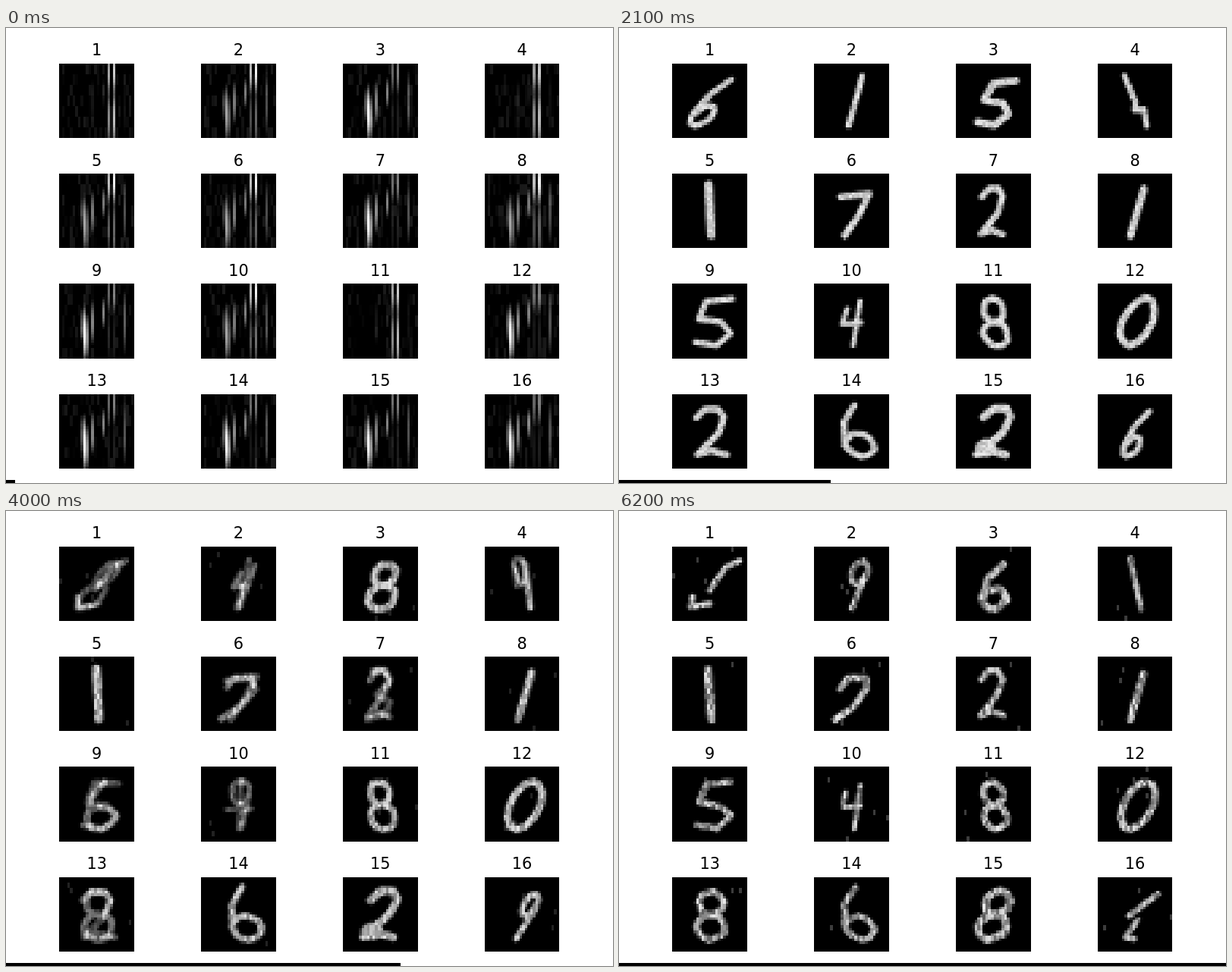
These frames come from a looping animation (800 by 600 pixels, 6300 ms). An HTML page with a canvas:

```html
<!DOCTYPE html>
<html lang="en">
<head>
<meta charset="utf-8">
<title>Digit samples</title>
<style>
html, body { margin: 0; width: 100%; height: 100%; overflow: hidden; background: #fff; }
canvas { display: block; }
</style>
</head>
<body>
<canvas id="stage" width="800" height="600"></canvas>
<script>
const STEP_MS = 100, STEPS = 63, GRID = 28, BOTTOM = 23.3;
const poseSteps = [13, 21, 34, 45, 56, 62];

// Handwriting shapes in a unit box.
const glyphs = {
  one: pen => pen.line(.5, 0, .5, 1),
  two: pen => pen.line(.05, .2, .3, .02, .7, .02, .9, .2, .75, .5, .1, .95, .5, .87, 1, .95),
  three: pen => pen.line(.2, .03, .7, .03, .9, .25, .45, .5, .95, .65, .8, .9, .1, 1),
  four: pen => { pen.line(.2, .25, .1, .55, .8, .5); pen.line(.75, .1, .6, 1); },
  five: pen => pen.line(1, .02, .3, .05, .1, .42, .7, .52, 1, .72, .6, 1, 0, .92),
  six: pen => { pen.line(.6, 0, .2, .35, .1, .75); pen.ring(.5, .78, .42, .22); },
  seven: pen => pen.line(0, .12, .95, .03, .75, .5, .4, 1),
  eight: pen => { pen.ring(.5, .25, .38, .24); pen.ring(.5, .74, .45, .26); },
  nine: pen => { pen.ring(.5, .25, .38, .24); pen.line(.85, .3, .6, 1); },
  zero: pen => pen.ring(.5, .5, .5, .5),
  hook: pen => { pen.line(.9, 0, .45, .1, .5, .6); pen.line(0, .75, .3, .97, 1, .9); },
  curl: pen => pen.line(.05, .3, .25, .05, .85, .05, 1, .3, .6, .75, .05, 1),
  bend: pen => pen.line(.1, 0, .4, .55, .3, .68, .85, .7, .85, 1),
  cross: pen => { pen.line(.5, 0, .5, 1); pen.line(0, .6, 1, .6); },
  blot: pen => { glyphs.two(pen); pen.ring(.3, .83, .22, .1); },
  elbow: pen => { pen.line(1, 0, 0, .5); pen.line(.6, .55, .4, .95, .9, 1); }
};

// Strengths of the opening stripes: left, middle, top, lower right.
const stripeKinds = {
  rail: [0, .1, .8, .9],
  left: [1, .65, .5, .15],
  mixed: [.65, .6, .95, .5]
};

// Opening stripes: column, first row, last row, group, gain.
const stripeBars = [
  [8, 9, 22, 0, .35], [9, 7, 30, 0, 1], [10, 11, 29, 0, .6],
  [12, 6, 23, 1, .8], [16, 5, 17, 1, .8], [24, 2, 27, 1, .5],
  [18, -6, 12, 2, .8], [20, -6, 12, 2, 1],
  [18, 9, 32, 3, .6], [20, 8, 33, 3, .8]
];

function digit(poses, stripes, center, top, width, slant, weight) {
  const box = { center, top, width, slant };
  const paths = poses.split(' ').map((name, i) => trace(glyphs[name], box, i));
  return { paths, stripes: stripeKinds[stripes], weight };
}

const clamp = v => Math.max(0, Math.min(1, v));
const ease = v => v * v * (3 - 2 * v);
function noise(a, b, c) {
  const v = Math.sin(a * 12.9898 + b * 78.233 + c * 37.719) * 43758.5453;
  return v - Math.floor(v);
}

function trace(glyph, box, seed) {
  const path = new Path2D();
  const wobble = (x, y) => (noise(x, y, seed) - .5) * .8;
  const place = (x, y) => [
    box.center + box.width * (x - .5) + box.slant * (.5 - y) + wobble(x, y),
    box.top + (BOTTOM - box.top) * y + wobble(y, x)
  ];
  const line = (...values) => {
    for (let i = 0; i < values.length; i += 2) {
      path[i ? 'lineTo' : 'moveTo'](...place(values[i], values[i + 1]));
    }
  };
  const ring = (x, y, rx, ry) => {
    const sides = 12;
    for (let i = 0; i < sides; i++) {
      const angle = i / sides * 2 * Math.PI;
      path[i ? 'lineTo' : 'moveTo'](...place(x + rx * Math.cos(angle), y + ry * Math.sin(angle)));
    }
    path.closePath();
  };
  glyph({ line, ring });
  return path;
}

const digits = [
  digit('six six eight hook hook hook', 'rail', 15, 5.5, 9, 13, 2.2),
  digit('one one one four nine nine', 'mixed', 15.7, 5, 8, 5, 2.2),
  digit('five five eight eight five six', 'left', 15, 6.3, 11, 3, 2.8),
  digit('bend bend four nine one one', 'rail', 14.5, 4, 6, -4, 2.1),
  digit('one one one one one one', 'mixed', 14.3, 4.5, 4, -1, 3.1),
  digit('curl seven seven curl curl curl', 'mixed', 14, 7, 11, 3, 2.5),
  digit('two two three two two two', 'left', 13.5, 5, 9, 1, 2.4),
  digit('one one one one one one', 'mixed', 15, 6, 4, 5, 2.8),
  digit('five five five six six five', 'left', 15.5, 5.5, 13, 0, 2.3),
  digit('four four cross nine four four', 'mixed', 14.5, 5, 9, 1, 1.9),
  digit('eight eight eight eight eight eight', 'rail', 14.3, 5.5, 10, -2, 2.4),
  digit('zero zero zero zero zero zero', 'left', 15, 5.5, 11.5, 6, 2.7),
  digit('blot two two eight eight eight', 'left', 14.5, 5, 12, 0, 2.5),
  digit('six six six six six six', 'left', 16, 3.5, 13, -4, 2.3),
  digit('blot blot blot blot eight eight', 'left', 14.5, 4.8, 12, 4, 2.9),
  digit('six six nine nine elbow elbow', 'left', 15, 6, 7, 8, 2.2)
];

const stage = document.getElementById('stage').getContext('2d');
const tileCanvas = document.createElement('canvas');
tileCanvas.width = tileCanvas.height = GRID;
const tile = tileCanvas.getContext('2d', { willReadFrequently: true });
tile.lineCap = tile.lineJoin = 'round';

function dot(x, y, level) {
  tile.fillStyle = `rgba(255,255,255,${level})`;
  tile.fillRect(x, y, 1, 1);
}

function drawStripes(strengths, index, alpha) {
  for (const [x, top, bottom, group, gain] of stripeBars) {
    for (let y = Math.max(0, top); y < Math.min(GRID, bottom); y++) {
      const hump = Math.sin(Math.PI * (y - top + .5) / (bottom - top));
      dot(x, y, hump * gain * strengths[group] * alpha);
    }
  }
  for (let x = 1; x < GRID; x++) {
    for (let y = 0; y < GRID; y++) {
      dot(x, y, clamp(noise(x, y >> 2, index) - .7) * .35 * alpha);
    }
  }
}

function drawPose(path, weight, alpha) {
  tile.globalAlpha = alpha;
  tile.strokeStyle = '#fff';
  tile.lineWidth = weight;
  tile.stroke(path);
  tile.globalAlpha = 1;
}

function addGrain(index, step) {
  const image = tile.getImageData(0, 0, GRID, GRID);
  const late = ease(clamp((step - 34) / 11));
  for (let y = 0; y < GRID; y++) {
    for (let x = 0; x < GRID; x++) {
      const at = (y * GRID + x) * 4;
      const grain = noise(x + index * GRID, late ? y >> 1 : y, step);
      const speck = grain > .994 ? 60 * late : 0;
      const level = image.data[at] * (.92 - (.22 + .34 * late) * grain) + speck;
      image.data[at] = image.data[at + 1] = image.data[at + 2] = level;
    }
  }
  tile.putImageData(image, 0, 0);
}

function drawTile(index, step) {
  const { paths, stripes, weight } = digits[index];
  tile.fillStyle = '#000';
  tile.fillRect(0, 0, GRID, GRID);
  if (step < 3) drawStripes(stripes, index, 1 - step / 3);
  if (step === 0) return;
  const next = poseSteps.findIndex(s => s >= step);
  if (next === 0) {
    drawPose(paths[0], weight + 2 * clamp(1 - step / 7), clamp(step / 6));
  } else {
    const from = poseSteps[next - 1];
    const mix = ease((step - from) / (poseSteps[next] - from));
    tile.globalCompositeOperation = 'lighter';
    drawPose(paths[next - 1], weight, 1 - mix);
    drawPose(paths[next], weight, mix);
    tile.globalCompositeOperation = 'source-over';
  }
  addGrain(index, step);
}

function drawStage(step) {
  stage.fillStyle = '#fff';
  stage.fillRect(0, 0, 800, 600);
  stage.imageSmoothingEnabled = false;
  stage.font = '20.83px "DejaVu Sans", sans-serif';
  stage.textAlign = 'center';
  digits.forEach((_, index) => {
    const left = 70.3 + 186.8 * (index % 4);
    const top = 46.6 + 145.35 * Math.floor(index / 4);
    const x = Math.round(left), y = Math.round(top);
    drawTile(index, step);
    stage.drawImage(tileCanvas, x, y, Math.round(left + 98.7) - x, Math.round(top + 98.5) - y);
    stage.fillStyle = '#000';
    stage.fillText(index + 1, left + 49.4, Math.round(top - 10.4));
  });
  stage.fillRect(0, 596, Math.floor(800 * (step + 1) / STEPS), 4);
}

let shown = -1;
const start = performance.now();
function tick() {
  const step = Math.floor((performance.now() - start) / STEP_MS) % STEPS;
  if (step !== shown) drawStage(shown = step);
  requestAnimationFrame(tick);
}
tick();
</script>
</body>
</html>
```
